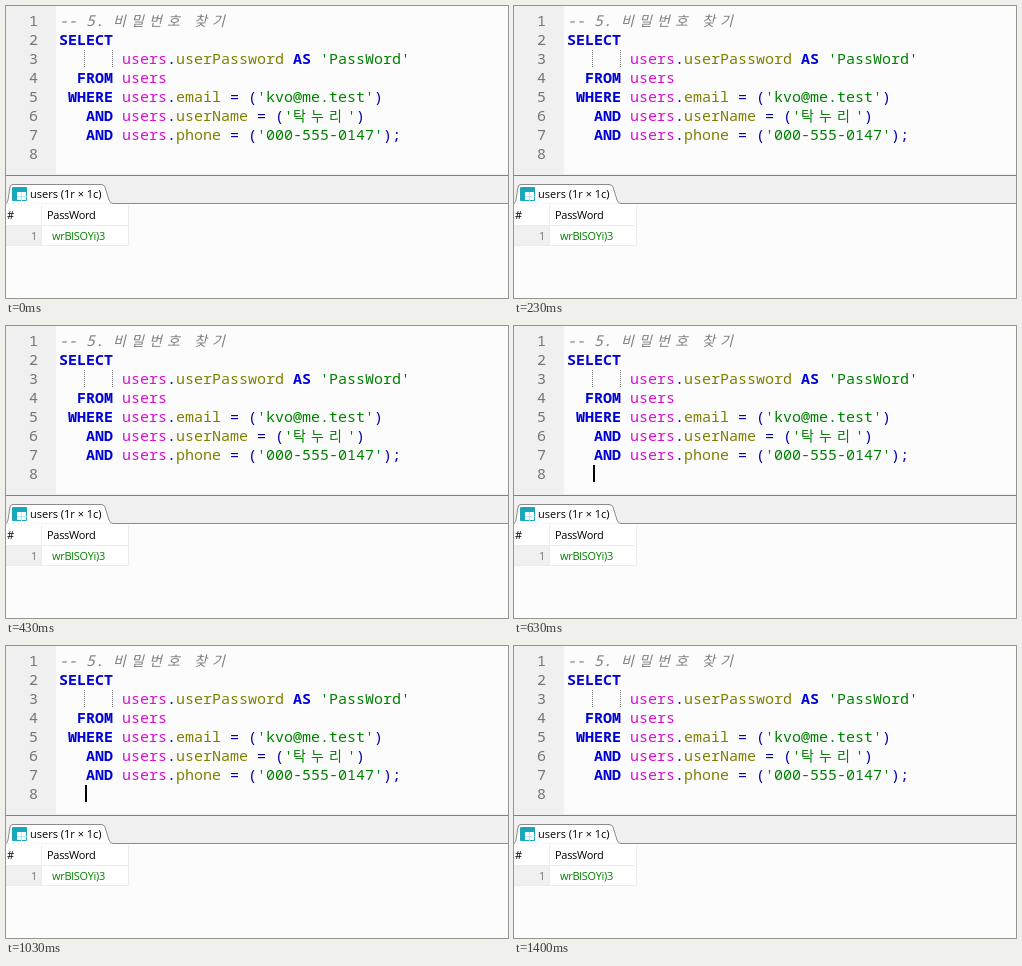
An HTML page that plays this animation: 502 px wide and 292 px high, repeating every 1.43 s.

```html
<!DOCTYPE html>
<html lang="ko">
<head>
<meta charset="utf-8">
<style>
  html, body { margin: 0; height: 100%; overflow: hidden; background: #fcfcfc; }
  svg { display: block; }
  text { white-space: pre; }
  .code { font: 15px "Noto Sans Mono", monospace; fill: #0000b0; }
  .ui { font: 11px "Open Sans", "Noto Sans", sans-serif; fill: #000; }
  .grid { letter-spacing: -.3px; }
  .num { fill: #747474; }
  .key { fill: #0000d8; font-weight: bold; }
  .table { fill: #d810d0; }
  .field { fill: #808000; }
  .str { fill: #008000; }
  .hangul { font-family: "Noto Sans CJK KR", "Noto Sans CJK", sans-serif; font-size: 14px; }
  .note { fill: #808080; font-style: italic; }
</style>
</head>
<body>
<svg width="502" height="292" viewBox="0 0 502 292">
  <rect width="50" height="168" fill="#f0f0f0"/>
  <g id="code" class="code"></g>
  <path d="M78.5 44V62M106.5 44V62" stroke="#777" stroke-dasharray="1 1"/>
  <rect id="caret" x="79" y="139" width="2" height="17"/>

  <rect y="168" width="502" height="30" fill="#f0f0f0"/>
  <path d="M0 169.500H502" stroke="#808080"/>
  <path d="M0 197.500Q1.500 197 2 194L4 181Q4.500 178.500 7 178.500H95Q98 178.500 99 181L103 194Q104 197.500 107 197.500H502" fill="#fff" stroke="#8c8c8c"/>
  <rect y="198" width="123" height="41" fill="#fff"/>
  <g id="icon">
    <rect x="6" y="181" width="15" height="14" rx="1" fill="#18a8bc"/>
    <path d="M11 186h4v4h-4zM16 186h4v4h-4zM11 191h4v3h-4zM16 191h4v3h-4z" fill="#fff"/>
    <path d="M15.500 186V195M11 190.500H21" stroke="#b8e4ea"/>
  </g>
  <text class="ui" x="24" y="192">users (1r × 1c)</text>

  <rect y="220" width="35" height="19" fill="#f0f0f0"/>
  <path d="M0 219.500H122.500M0 239.500H122.500V199M35.500 199V239" fill="none" stroke="#ececec"/>
  <g class="ui grid">
    <text x="1" y="213">#</text>
    <text x="41" y="213">PassWord</text>
    <text x="25" y="234" class="num">1</text>
    <text x="46" y="234" class="str">wrBlSOYi)3</text>
  </g>
</svg>
<script>
const CELL = 9, LEFT = 53, LOOP = 1430, CARET_ON = 570, CARET_OFF = 1100;

// Each line is a list of [class, text]; Hangul fills two cells per letter.
const lines = [
  [['note', '-- 5. 비밀번호 찾기']],
  [['key', 'SELECT']],
  [['', ' '.repeat(7)], ['table', 'users'], ['', '.'], ['field', 'userPassword '], ['key', 'AS'], ['str', " 'PassWord'"]],
  [['key', '  FROM '], ['table', 'users']],
  [['key', ' WHERE '], ...condition('email', 'kvo@me.test'), ['', ')']],
  [['key', '   AND '], ...condition('userName', '탁누리'), ['', ')']],
  [['key', '   AND '], ...condition('phone', '000-555-0147'), ['', ');']],
  []
];

function condition(field, value) {
  return [['table', 'users'], ['', '.'], ['field', field], ['', ' = ('], ['str', `'${value}'`]];
}

function addText(x, y, cls, text) {
  const node = document.createElementNS('http://www.w3.org/2000/svg', 'text');
  node.setAttribute('x', x);
  node.setAttribute('y', y);
  node.setAttribute('class', cls);
  node.textContent = text;
  document.getElementById('code').append(node);
}

lines.forEach((parts, row) => {
  const y = 20 + row * 19;
  let x = LEFT;
  addText(23, y, 'num', row + 1);
  for (const [cls, text] of parts) {
    for (const run of text.match(/[가-힣]|[^가-힣]+/g)) {
      const wide = run >= '가';
      const indent = run.length - run.trimStart().length;
      addText(x + indent * CELL, y, wide ? cls + ' hangul' : cls, run.trim());
      x += CELL * (wide ? 2 : run.length);
    }
  }
});

const caret = document.getElementById('caret');
function draw() {
  const t = performance.now() % LOOP;
  caret.style.visibility = t >= CARET_ON && t < CARET_OFF ? 'visible' : 'hidden';
  requestAnimationFrame(draw);
}
draw();
</script>
</body>
</html>
```
